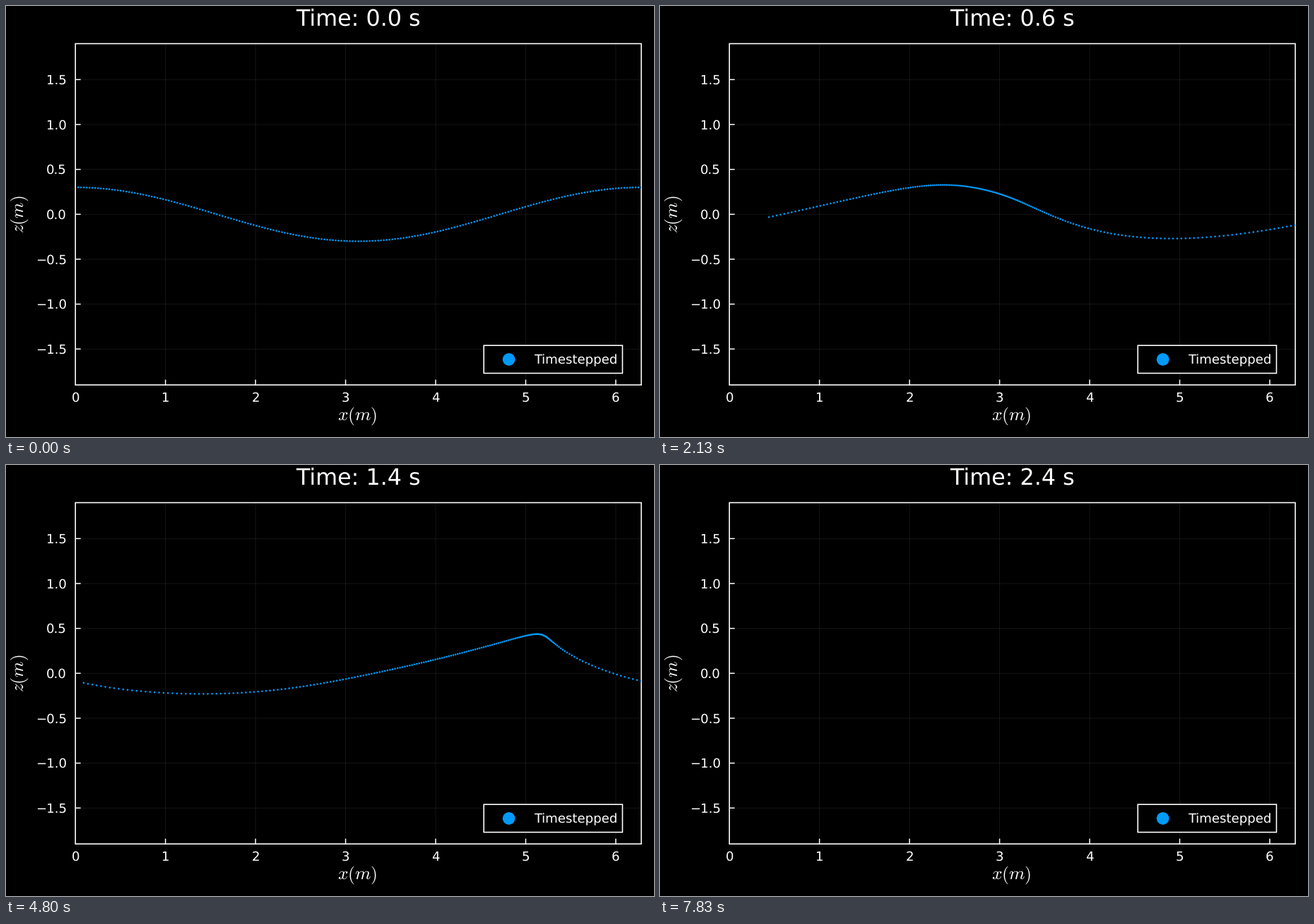
A matplotlib script that plays this animation: 917x611 px, repeating every 8000 ms.

```python
import numpy as np
import matplotlib.pyplot as plt
from matplotlib.animation import FuncAnimation
from matplotlib.patches import Ellipse, Rectangle

W, H = 917, 611
LEFT, RIGHT, TOP, BOTTOM = 98.2, 899.0, 53.4, 537.2
XMAX, YMAX = 2 * np.pi, 1.9
XPX, YPX = (RIGHT - LEFT) / XMAX, (BOTTOM - TOP) / (2 * YMAX)
BLUE = "#009afa"

FRAMES, INTERVAL = 400, 20
LAST_SHOWN = 191

N = 400
SKIP = 2
G = 9.81
AMP = 0.3
DT = 0.01
SUBSTEPS = 2

STEP = 2 * np.pi / N
THETA = STEP * np.arange(1, N + 1)
K = np.fft.fftfreq(N, 1 / N)
IK = 1j * np.where(np.abs(K) == N // 2, 0, K)
SMOOTH = np.exp(-36 * (np.abs(K) / (N / 2)) ** 10)


def spectral(f, factor):
    return np.fft.ifft(np.fft.fft(f) * factor)


def stream(z, dz, phi):
    """Stream function on the surface, from Cauchy's integral on alternate points."""
    zeta = np.exp(-1j * z)
    weight = 2j / np.pi * STEP * -1j * zeta * dz
    gap = 1 / (zeta[None, 1::2] - zeta[0::2, None])
    a = weight[None, 1::2] * gap
    b = -weight[None, 0::2] * gap.T
    even, odd = a.imag @ phi[1::2], b.imag @ phi[0::2]
    ar, br = a.real.copy(), b.real.copy()
    m = np.eye(N // 2) - ar @ br + 2 / N
    psi = np.empty(N)
    psi[0::2] = np.linalg.solve(m, even + ar @ odd)
    psi[1::2] = odd + br @ psi[0::2]
    return psi


def rates(z, phi):
    dz = 1 + spectral(z - THETA, IK)
    w = phi + 1j * stream(z, dz, phi)
    vel = np.conj(spectral(w, IK) / dz)
    return vel, 0.5 * np.abs(vel) ** 2 - G * z.imag


def advance(z, phi, dt):
    v1, p1 = rates(z, phi)
    v2, p2 = rates(z + dt / 2 * v1, phi + dt / 2 * p1)
    v3, p3 = rates(z + dt / 2 * v2, phi + dt / 2 * p2)
    v4, p4 = rates(z + dt * v3, phi + dt * p3)
    z = z + dt / 6 * (v1 + 2 * v2 + 2 * v3 + v4)
    phi = phi + dt / 6 * (p1 + 2 * p2 + 2 * p3 + p4)
    return THETA + spectral(z - THETA, SMOOTH), spectral(phi, SMOOTH).real


def simulate():
    z = THETA + 1j * AMP * np.cos(THETA)
    phi = AMP * np.sqrt(G) * np.sin(THETA)
    states = [z]
    with np.errstate(all="ignore"):
        for _ in range(LAST_SHOWN):
            for _ in range(SUBSTEPS):
                z, phi = advance(z, phi, DT / SUBSTEPS)
            if not np.isfinite(z).all() or np.abs(z.imag).max() > 1:
                break
            states.append(z)
    return states


plt.rcParams.update({
    "font.family": "DejaVu Sans",
    "mathtext.fontset": "cm",
    "text.color": "white",
    "text.hinting": "none",
    "text.kerning_factor": 6,
    "path.simplify": False,
})


def pt(px):
    return px * 0.72


def at(x, y):
    return x / W, 1 - y / H


fig = plt.figure(figsize=(W / 100, H / 100), dpi=100, facecolor="black")
ax = fig.add_axes([LEFT / W, 1 - BOTTOM / H,
                   (RIGHT - LEFT) / W, (BOTTOM - TOP) / H])
ax.set(xlim=(0, XMAX), ylim=(-YMAX, YMAX))
ax.set_axis_off()


def label(x, y, text, px=18.2, **kw):
    return fig.text(*at(x, y), text, fontsize=pt(px), **kw)


xticks, yticks = np.arange(7), np.arange(-1.5, 1.6, 0.5)
grid = dict(color="white", alpha=0.1, lw=pt(0.8), snap=False)
tick = dict(color="white", lw=pt(1.5), snap=False)
ax.vlines(xticks, -YMAX, YMAX, **grid)
ax.hlines(yticks, 0, XMAX, **grid)
ax.vlines(xticks, -YMAX, -YMAX + 7.5 / YPX, **tick)
ax.hlines(yticks, 0, 7.5 / XPX, **tick)
ax.add_patch(Rectangle((0, 0), 1, 1, transform=ax.transAxes, fill=False,
                       ec="white", lw=pt(1.6), snap=False, clip_on=False))

for v in xticks:
    label(LEFT + v * XPX - 5.75, 561, f"{v}")
for v in yticks:
    text = f"{v:.1f}".replace("-", "\u2212")
    label(42 if v < 0 else 57, (TOP + BOTTOM) / 2 - v * YPX + 6.6, text)
label(497, 581.5, "$x(m)$", 25.5, ha="center", va="center")
label(19.5, 295.5, "$z(m)$", 25.5, ha="center", va="center", rotation=90)
title = label(410.3, 28, "", 31.8)

fig.add_artist(Rectangle(at(676.2, 520.6), 196.2 / W, 39.4 / H, fc="black",
                         ec="white", lw=pt(1.6), snap=False))
fig.add_artist(Ellipse(at(711.6, 501), 17.6 / W, 17.6 / H, fc=BLUE, lw=0))
label(747, 507.6, "Timestepped")

# Tiny round-capped strokes keep the dots at sub-pixel positions.
dots, = ax.plot([], [], color=BLUE, lw=pt(2.7), solid_capstyle="round",
                snap=False, zorder=3)
states = simulate()


def draw(i):
    n = (i * INTERVAL * 3 + 50) // 100
    title.set_text(f"Time: {n / 100:.1f} s")
    if n > LAST_SHOWN:
        dots.set_data([], [])
    else:
        z = states[min(n, len(states) - 1)][SKIP - 1::SKIP]
        gap = np.full(len(z), np.nan)
        xs = np.column_stack([z.real - 2e-4, z.real + 2e-4, gap])
        ys = np.column_stack([z.imag, z.imag, gap])
        dots.set_data(xs.ravel(), ys.ravel())
    return dots, title


def start():
    return draw(0)


anim = FuncAnimation(fig, draw, frames=FRAMES, init_func=start,
                     interval=INTERVAL, repeat=True, repeat_delay=0)
plt.show()
```
